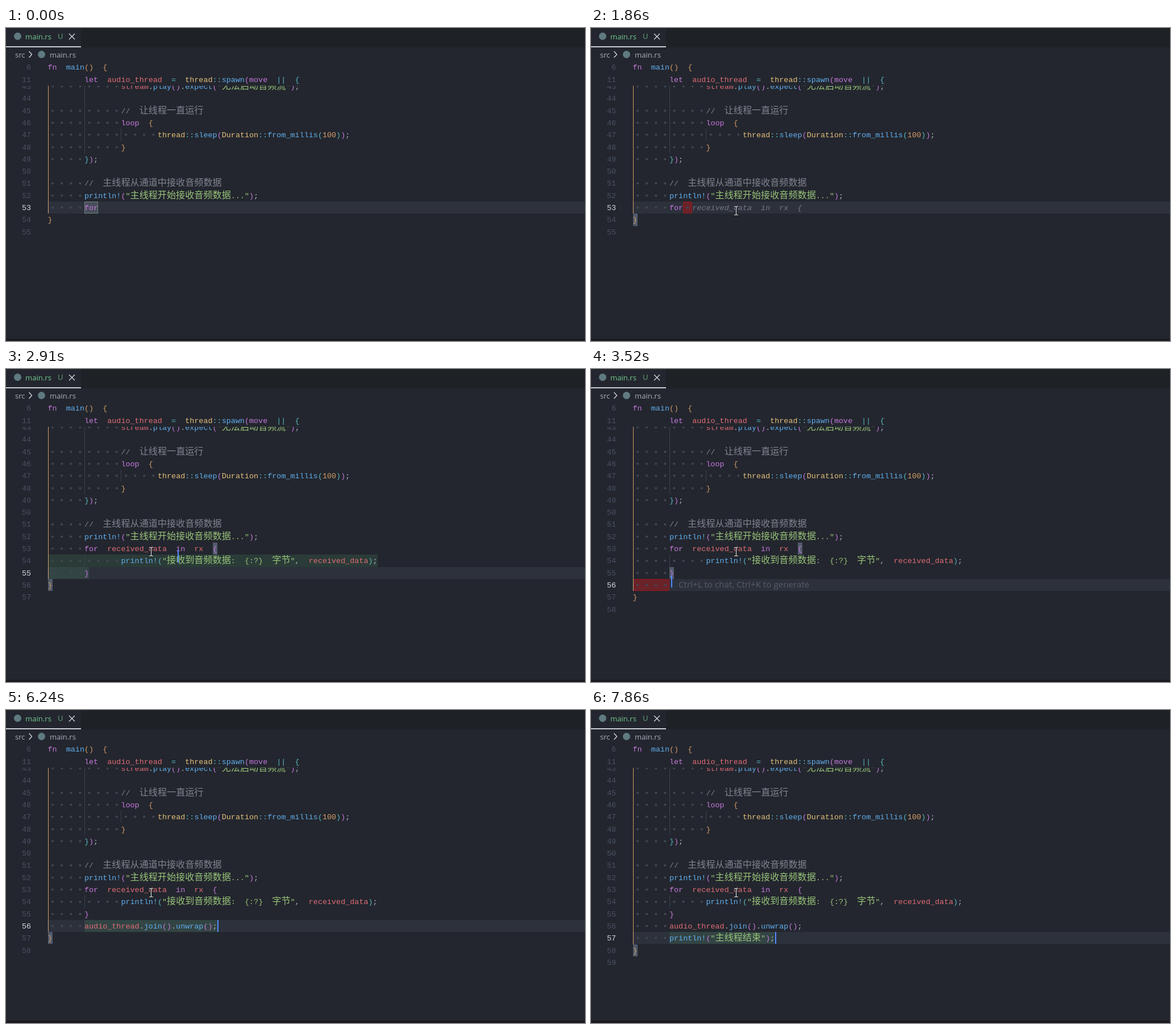
Write an HTML page that moves like this. It is 1019x550 px and loops after 8 s.

```html
<!DOCTYPE html>
<html lang="zh">
<head>
<meta charset="utf-8">
<title>main.rs</title>
<style>
html, body { margin: 0; width: 100%; height: 100%; overflow: hidden; background: #23262e; }
#stage { position: relative; width: 1019px; height: 550px; overflow: hidden; background: #23262e; }
#stage div, #stage svg { position: absolute; box-sizing: border-box; }
.layer { inset: 0; }
#editor { clip-path: inset(101.5px 0 0 0); }

/* window chrome */
.ui { font: 13.1px/20px "Open Sans", "Noto Sans", sans-serif; white-space: pre; color: #a9afba; }
.tabs { left: 0; top: 0; width: 100%; height: 34px; background: #1e2126; }
.tab { left: 0; top: 0; width: 132px; height: 34px; background: #23262e; border-bottom: 2px solid #c9ccd2; }
.dot { width: 13px; height: 13px; border-radius: 50%; background: #5f7a80; }
.foot { left: 0; bottom: 0; width: 100%; height: 4px; background: #1a1c22; }

/* code: 8.06px cells, a space takes two of them */
.code, .num { height: 21.3px; font: 13.43px/24.5px "Liberation Mono", monospace; white-space: pre; word-spacing: 8.06px; color: #abb2bf; }
.num { left: 0; width: 44px; text-align: right; color: #495162; }
.num.on { color: #d4d7dd; }
.cjk { font: 300 16.12px/0 "Noto Sans CJK SC", "Noto Sans CJK", sans-serif; }
.k { color: #c678dd; } .f { color: #61afef; } .v { color: #e06c75; } .t { color: #e5c07b; }
.o { color: #d19a66; } .s { color: #98c379; } .c { color: #56b6c2; } .n { color: #7f848e; }
.g, .z { color: #747984; font-style: italic; }
.p { margin-left: 16px; color: #565c68; font: 15.2px/0 "Open Sans", "Noto Sans", sans-serif; word-spacing: 0; }

.mark { height: 21.3px; }
.active { background: #2c313c; }
.tint { background: rgba(80, 150, 100, .19); }
.red { background: rgba(255, 0, 0, .3); border: 1px solid rgba(255, 0, 0, .3); border-radius: 3px; }
.word { background: #484e5b; border: 1px solid #70827f; }
.bracket { background: #515a6b; }
.dots { background: radial-gradient(circle, #414650 1.7px, transparent 2.3px) 0 0 / 16.12px 100%; }
.guide { width: 1px; background: #3b4048; }
.guide.lit { background: #d19a66; }
.caret { width: 2px; height: 21.3px; background: #528bff; }
</style>
</head>
<body>
<div id="stage">
  <div class="tabs"></div>
  <div class="tab"></div>
  <div class="dot" style="left:14px;top:8px"></div>
  <div class="ui" style="left:34px;top:5px;color:#73c991">main.rs</div>
  <div class="ui" style="left:91px;top:4px;color:#5fa57a">U</div>
  <div class="ui" style="left:16px;top:37px">src</div>
  <div class="dot" style="left:56px;top:40px"></div>
  <div class="ui" style="left:77px;top:37px">main.rs</div>
  <svg width="132" height="60" fill="none" stroke="#d7dae0" stroke-width="1.3" style="left:0;top:0">
    <path d="M111 10l10 10m0-10l-10 10M40.500 41l5 5.500l-5 5.500"/>
  </svg>
  <div id="sticky" class="layer"></div>
  <div id="editor" class="layer">
    <div id="live" class="layer"></div>
    <div id="fixed" class="layer"></div>
    <div id="caret" class="caret"></div>
  </div>
  <svg id="mouse" width="11" height="18" style="left:250px;top:312px" fill="none">
    <path id="beam" d="M2 1.500h2.500l1 1l1-1h2.500M5.500 2.500v13M2 16.500h2.500l1-1l1 1h2.500" stroke="#16181d" stroke-width="2.600"/>
    <use href="#beam"/>
    <path d="M2 1.500h2.500l1 1l1-1h2.500M5.500 2.500v13M2 16.500h2.500l1-1l1 1h2.500" stroke="#f2f2f2" stroke-width="1.100"/>
  </svg>
  <div class="foot"></div>
</div>
<script>
const LOOP = 8000, CELL = 8.06, ROW = 21.3;
const $ = id => document.getElementById(id);
const colX = col => 73.5 + col * CELL;
const rowY = row => 305 + (row - 53) * ROW;

const box = (cls, x, y, w, h, html = '') =>
  `<div class="${cls}" style="left:${x}px;top:${y}px;${w ? `width:${w}px;` : ''}${h ? `height:${h}px` : ''}">${html}</div>`;
const mark = (kind, row, col, cells) => box('mark ' + kind, colX(col), rowY(row), cells * CELL);
const guide = (col, from, to, lit) =>
  box('guide' + (lit ? ' lit' : ''), Math.round(colX(col)), rowY(from), 0, (to - from) * ROW);
const number = (row, n, on) => `<div class="num ${on ? 'on' : ''}" style="top:${rowY(row)}px">${n}</div>`;

// "§x" switches to colour class x
const paint = text => text.split('§').slice(1).map(part =>
  `<span class="${part[0]}">${part.slice(1).replace(/[一-龥]+/g, '<span class="cjk">$&</span>')}</span>`).join('');
const code = (row, indent, text) => box('code', colX(indent * 2), rowY(row), 0, 0, paint(text));
const dots = (row, indent) => indent ? mark('dots', row, 0, indent * 2) : '';

const upper = [
  [8, '§vstream§d.§fplay§k()§d.§fexpect§k(§s"无法启动音频流"§k)§d;'],
  [0, ''],
  [8, '§n// 让线程一直运行'],
  [8, '§kloop §o{'],
  [12, '§tthread§c::§fsleep§k(§tDuration§c::§ffrom_millis§c(§o100§c)§k)§d;'],
  [8, '§o}'],
  [4, '§c}§k)§d;'],
  [0, ''],
  [4, '§n// 主线程从通道中接收音频数据'],
  [4, '§fprintln!§k(§s"主线程开始接收音频数据..."§k)§d;'],
];

const END = [0, '§o}'];
const FOR = [4, '§kfor'];
const LOOP_HEAD = [4, '§kfor §vreceived_data §kin §vrx §k{'];
const BODY = [
  LOOP_HEAD,
  [8, '§fprintln!§c(§s"接收到音频数据: {:?} 字节"§d, §vreceived_data§c)§d;'],
  [4, '§k}'],
];
const JOIN = [4, '§vaudio_thread§d.§fjoin§k()§d.§funwrap§k()§d;'];
const DONE = [4, '§fprintln!§k(§s"主线程结束"§k)§d;'];
const HINT = [4, '§pCtrl+L to chat, Ctrl+K to generate'];

// Each step changes part of the state; carets are [column, row].
const steps = [
  [0, { lines: [FOR, END], active: 53, lit: true, mouse: false, caret: null, marks: [['word', 53, 8, 3]] }],
  [50, { mouse: true, marks: [['word', 53, 8, 3], ['bracket', 54, 0, 1]] }],
  [360, { caret: [11, 53] }],
  [910, { caret: null }],
  [1310, { caret: [13, 53], marks: [['dots', 53, 11, 2], ['bracket', 54, 0, 1]] }],
  [1360, { marks: [['red', 53, 11, 2], ['dots', 53, 11, 2], ['bracket', 54, 0, 1]] }],
  [1560, { lines: [[4, '§kfor §greceived_data in rx {'], END] }],
  [1860, { caret: null }],
  [2210, {
    lines: [LOOP_HEAD, [8, '§zprintln!("接收到音频数据: {:?} 字节", received_data);'], [4, '§z}'], [0, '§k}']],
    lit: false, caret: [27, 53],
    marks: [['tint', 53, 13, 24], ['bracket', 53, 36, 1], ['bracket', 56, 0, 1]],
  }],
  [2260, { caret: [37, 53] }],
  [2510, { caret: [37, 53.85] }],
  [2560, { caret: [37, 53.3] }],
  [2610, { caret: [37, 53] }],
  [2760, { caret: null }],
  [2910, {
    lines: [...BODY, END], active: 55, lit: true, caret: [28.3, 53.62],
    marks: [['tint', 54, 0, 72], ['tint', 55, 0, 9], ['bracket', 53, 36, 1], ['bracket', 56, 0, 1]],
  }],
  [2960, {
    caret: [14, 54.65],
    marks: [['tint', 54, 0, 72], ['tint', 55, 0, 9], ['bracket', 53, 36, 1], ['bracket', 55, 8, 1]],
  }],
  [3010, { caret: [9, 55] }],
  [3260, { caret: [9, 54.76] }],
  [3310, { caret: [9, 55] }],
  [3520, {
    lines: [...BODY, HINT, END], active: 56, caret: [8.3, 55.7],
    marks: [['red', 56, 0, 8], ['bracket', 53, 36, 1], ['bracket', 55, 8, 1]],
  }],
  [3570, { caret: [8, 56], marks: [['red', 56, 0, 8], ['bracket', 57, 0, 1]] }],
  [3870, { lines: [...BODY, [4, '§gaudio_thread.join().unwrap();'], END] }],
  [4120, { caret: null }],
  [4470, { caret: [8, 56] }],
  [5080, { caret: null }],
  [5230, {
    lines: [...BODY, JOIN, END], caret: [25, 56],
    marks: [['tint', 56, 8, 29], ['bracket', 57, 0, 1]],
  }],
  [5280, { caret: [37, 56] }],
  [5780, { caret: null }],
  [6240, { caret: [37, 56] }],
  [6440, {
    lines: [...BODY, JOIN, HINT, END], active: 57, caret: [28, 56.31],
    marks: [['red', 57, 0, 8], ['bracket', 58, 0, 1]],
  }],
  [6490, { caret: [14, 56.8] }],
  [6540, { caret: [8, 57] }],
  [6690, { lines: [...BODY, JOIN, [4, '§gprintln!("主线程结束");'], END] }],
  [7050, { caret: null }],
  [7460, { caret: [8, 57] }],
  [7760, {
    lines: [...BODY, JOIN, DONE, END], caret: [16, 57],
    marks: [['tint', 57, 8, 23], ['bracket', 58, 0, 1]],
  }],
  [7810, { caret: [26, 57] }],
  [7860, { caret: [31, 57] }],
];
let merged = {};
const states = steps.map(([at, change]) => merged = { ...merged, ...change, at });

const STICKY = 41.42;
$('sticky').innerHTML =
  number(STICKY, 6) + code(STICKY, 0, '§kfn §fmain§o() {') +
  number(STICKY + 1, 11) +
  code(STICKY + 1, 4, '§klet §vaudio_thread §c= §tthread§c::§fspawn§k(move §c|| {');

$('fixed').innerHTML = guide(8, 43, 49) + guide(16, 47, 48) +
  upper.map(([indent, text], i) =>
    number(43 + i, 43 + i) + dots(43 + i, indent) + code(43 + i, indent, text)).join('');

function render({ lines, active, lit, marks, caret, mouse }) {
  const last = 52 + lines.length;
  let n = 53;
  let html = box('mark active', 73, rowY(active), 946) +
    marks.map(m => mark(...m)).join('') + guide(0, 43, last, lit);
  if (lines[0] === LOOP_HEAD && lit) html += guide(8, 54, 55);
  lines.forEach(([indent, text], i) => {
    const row = 53 + i, preview = text.startsWith('§z');
    if (!preview) html += number(row, n++, row === active) + dots(row, indent);
    html += code(row, indent, text);
  });
  $('live').innerHTML = html + number(last + 1, n);

  $('caret').style.display = caret ? '' : 'none';
  if (caret) {
    $('caret').style.left = colX(caret[0]) + .5 + 'px';
    $('caret').style.top = rowY(caret[1]) + 'px';
  }
  $('mouse').style.display = mouse ? '' : 'none';
}

let shown;
function tick() {
  const t = performance.now() % LOOP;
  const state = states.findLast(s => s.at <= t);
  if (state !== shown) render(shown = state);
  requestAnimationFrame(tick);
}
tick();
</script>
</body>
</html>
```
